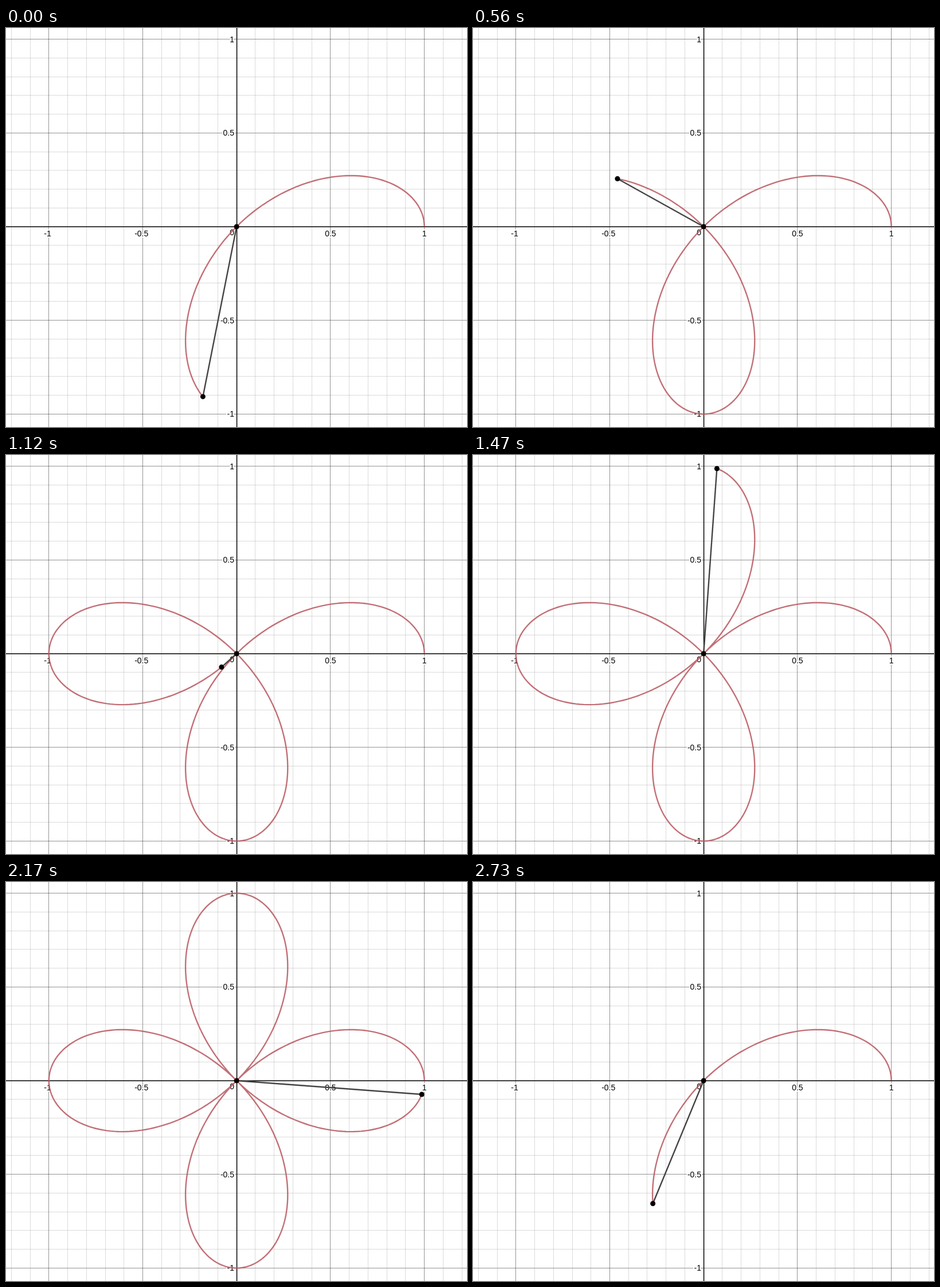
An HTML page with a canvas that plays this animation: 804 px wide and 697 px high, repeating every 2800 ms.

```html
<!DOCTYPE html>
<html lang="en">
<head>
<meta charset="utf-8">
<title>Four-petal rose</title>
<style>
  html, body { margin: 0; width: 100%; height: 100%; overflow: hidden; background: #fff; }
  canvas { display: block; }
</style>
</head>
<body>
<canvas id="plot" width="804" height="697"></canvas>
<script>
const W = 804, H = 697;
const CX = 402.2, CY = 347, UNIT = 327.4;
const STEP = 70, STEPS = 40;

// [step, angle in degrees], linear in between
const SWEEP = [[0, 78.8], [5, 123.8], [11, 177.9], [21, 265.9], [25, 302], [31, 355.75], [39, 427.6]];

const ctx = document.getElementById('plot').getContext('2d');
const grid = document.createElement('canvas');
grid.width = W;
grid.height = H;

function line(c, x1, y1, x2, y2, color, width) {
  c.strokeStyle = color;
  c.lineWidth = width;
  c.beginPath();
  c.moveTo(x1, y1);
  c.lineTo(x2, y2);
  c.stroke();
}

function label(c, text, x, y, align) {
  c.textAlign = align;
  c.strokeStyle = '#fff';
  c.lineWidth = 4;
  c.strokeText(text, x, y);
  c.fillStyle = '#000';
  c.fillText(text, x, y);
}

function drawGrid(c) {
  c.fillStyle = '#fff';
  c.fillRect(0, 0, W, H);

  const snap = v => Math.floor(v) + 0.5;
  const rules = (major, color) => {
    for (let k = -12; k <= 12; k++) {
      if (k === 0 || (k % 5 === 0) !== major) continue;
      const x = snap(CX + k * UNIT / 10), y = snap(CY + k * UNIT / 10);
      line(c, x, 0, x, H, color, 1);
      line(c, 0, y, W, y, color, 1);
    }
  };
  rules(false, 'rgba(0,0,0,0.14)');
  rules(true, 'rgba(0,0,0,0.42)');
  line(c, 402.6, 0, 402.6, H, '#000', 1.5);
  line(c, 0, 347.3, W, 347.3, '#000', 1.5);

  c.font = '14px "Liberation Sans", Arial, sans-serif';
  c.lineJoin = 'round';
  for (const v of [-1, -0.5, 0.5, 1]) {
    label(c, String(v), CX + v * UNIT - (v < 0 ? 2.3 : 0), 363.5, 'center');
    label(c, String(v), 398, CY - v * UNIT + 5, 'right');
  }
  label(c, '0', 398, 361.5, 'right');
}

function angleAt(step) {
  const i = Math.max(1, SWEEP.findIndex(([s]) => s >= step));
  const [s0, a0] = SWEEP[i - 1], [s1, a1] = SWEEP[i];
  const deg = a0 + (a1 - a0) * (step - s0) / (s1 - s0);
  return (deg % 360) * Math.PI / 180;
}

function rose(a) {
  const r = Math.cos(2 * a) * UNIT;
  return [CX + r * Math.cos(a), CY - r * Math.sin(a)];
}

function dot(x, y) {
  ctx.fillStyle = '#000';
  ctx.beginPath();
  ctx.arc(x, y, 4.5, 0, 2 * Math.PI);
  ctx.fill();
}

function draw(ms) {
  const end = angleAt(Math.floor(ms / STEP) % STEPS);
  const [x, y] = rose(end);
  ctx.drawImage(grid, 0, 0);

  ctx.strokeStyle = 'rgba(184,88,96,0.86)';
  ctx.lineWidth = 2.4;
  ctx.lineJoin = 'round';
  ctx.beginPath();
  const n = Math.max(2, Math.ceil(end * 80));
  for (let i = 0; i <= n; i++) ctx.lineTo(...rose(end * i / n));
  ctx.stroke();

  line(ctx, CX, CY, x, y, '#444', 2.4);
  dot(CX, CY);
  dot(x, y);
}

drawGrid(grid.getContext('2d'));
const start = performance.now();
function tick() {
  draw(performance.now() - start);
  requestAnimationFrame(tick);
}
tick();
</script>
</body>
</html>
```
